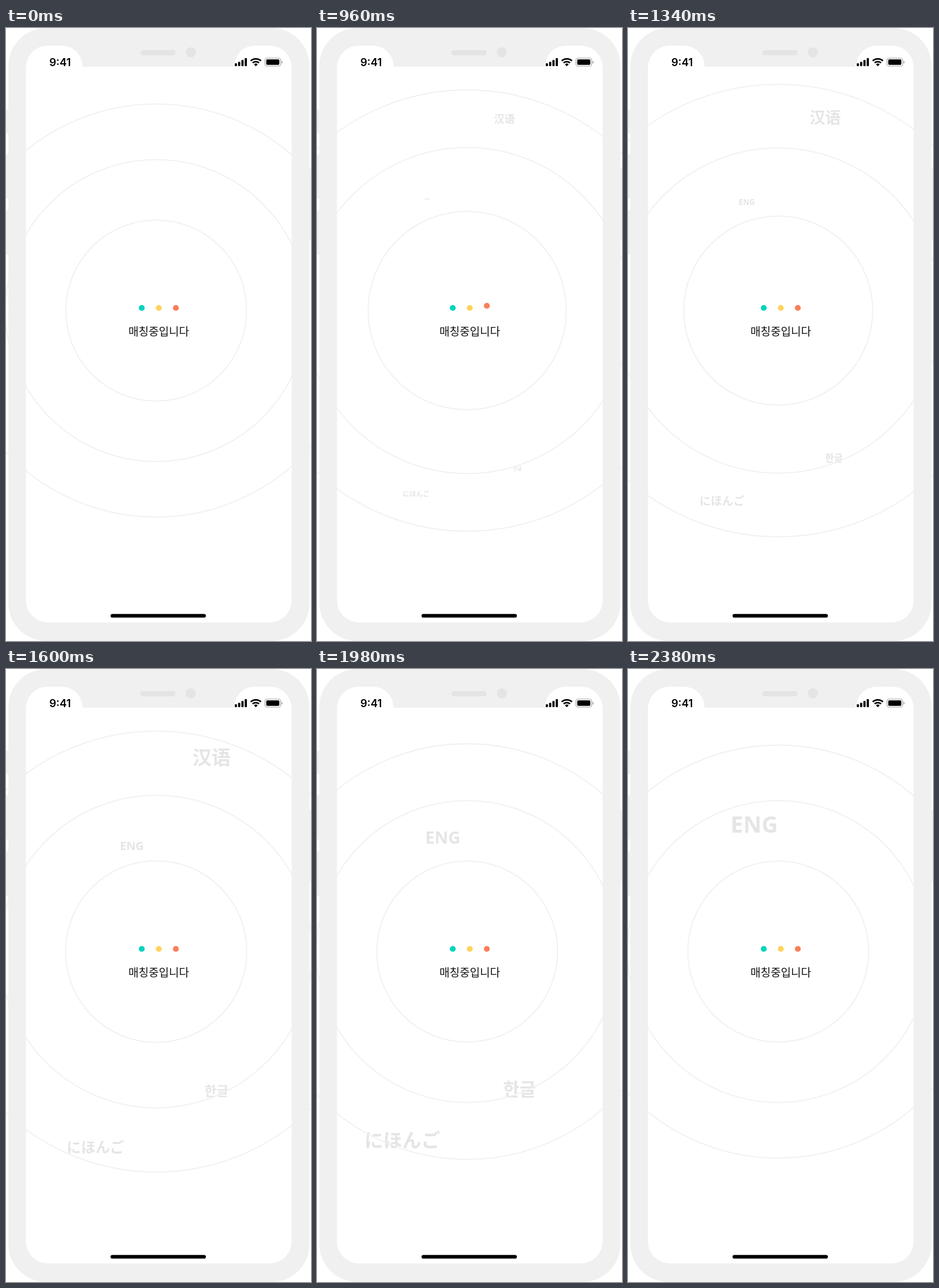
Animation, 528 px wide and 1060 px high, one loop 2400 ms. Source, as an HTML page with a canvas:

```html
<!DOCTYPE html>
<html lang="ko">
<head>
<meta charset="utf-8">
<style>
  html, body { margin: 0; width: 100%; height: 100%; overflow: hidden; background: #fff; }
  canvas { display: block; width: 528px; height: 1060px; }
</style>
</head>
<body>
<canvas id="stage"></canvas>
<script>
const W = 528, H = 1060, LOOP = 2400;
const canvas = document.getElementById('stage');
const ctx = canvas.getContext('2d');
const ratio = window.devicePixelRatio || 1;
canvas.width = W * ratio;
canvas.height = H * ratio;

const BODY = '#f0f0f0', DETAIL = '#e4e4e4', WORD = '#e5e5e5';
const cjk = region => `"Noto Sans CJK ${region}", "Noto Sans CJK", sans-serif`;

// Ripples: resting radius and the moment of full size
const rings = [
  { r: 156.5, peak: 1000 },
  { r: 261, peak: 1200 },
  { r: 357.1, peak: 1400 }
];
const RING_GROWTH = 0.1, RING_FALL = 620;

const dots = [
  { x: 235, color: '#05d2c0' },
  { x: 264.5, color: '#ffd35c' },
  { x: 294, color: '#fb7f59' }
];
const DOT_STEP = 300, DOT_TIME = 500, DOT_RISE = 6.2;

// Words grow from nothing over WORD_TIME while drifting along [time, x, y]
const WORD_TIME = 1600;
const words = [
  { text: '汉语', font: cjk('SC'), weight: 700, size: 37.8,
    path: [[200, 332, 147], [960, 324.5, 158], [1340, 341.5, 155], [1600, 356, 153], [1800, 367, 151.5]] },
  { text: 'にほんご', font: cjk('JP'), weight: 700, size: 33.2,
    path: [[400, 152, 807], [1000, 173.5, 805], [1600, 156, 826], [2000, 148.7, 814]] },
  { text: '한글', font: cjk('KR'), weight: 700, size: 36,
    path: [[600, 338, 778], [960, 347, 761.5], [1340, 356.5, 744], [1600, 364.5, 729], [1980, 350.5, 726], [2200, 339, 724]] },
  { text: 'ENG', font: '"Open Sans", "Noto Sans", sans-serif', weight: 700, size: 39.5,
    path: [[800, 185, 293], [960, 191, 295.5], [1340, 205.8, 301], [1600, 218, 306], [1980, 218, 292], [2400, 218.7, 268]] }
];

const lerp = (a, b, p) => a + (b - a) * p;
const smooth = p => p * p * (3 - 2 * p);

function along(path, t) {
  let i = 1;
  while (i < path.length - 1 && t > path[i][0]) i++;
  const [t0, x0, y0] = path[i - 1], [t1, x1, y1] = path[i];
  const p = (t - t0) / (t1 - t0);
  return [lerp(x0, x1, p), lerp(y0, y1, p)];
}

function box(x, y, w, h, r, color) {
  ctx.fillStyle = color;
  ctx.beginPath();
  ctx.roundRect(x, y, w, h, r);
  ctx.fill();
}

function disc(x, y, r, color) {
  ctx.fillStyle = color;
  ctx.beginPath();
  ctx.arc(x, y, r, 0, Math.PI * 2);
  ctx.fill();
}

// Centres the visible ink of the text on (x, y)
function label(text, font, x, y, color, scale = 1) {
  ctx.save();
  ctx.translate(x, y);
  ctx.scale(scale, scale);
  ctx.font = font;
  ctx.fillStyle = color;
  const m = ctx.measureText(text);
  ctx.fillText(text,
    (m.actualBoundingBoxLeft - m.actualBoundingBoxRight) / 2,
    (m.actualBoundingBoxAscent - m.actualBoundingBoxDescent) / 2);
  ctx.restore();
}

function drawWords(t) {
  for (const { text, font, weight, size, path } of words) {
    const age = (t - path[0][0]) / WORD_TIME;
    if (age <= 0 || age >= 1) continue;
    const [x, y] = along(path, t);
    label(text, `${weight} ${size}px ${font}`, x, y, WORD, age);
  }
}

function drawRings(t) {
  ctx.strokeStyle = BODY;
  ctx.lineWidth = 1.8;
  for (const { r, peak } of rings) {
    const p = t < peak ? t / peak : Math.max(0, 1 - (t - peak) / RING_FALL);
    ctx.beginPath();
    ctx.arc(260, 488.6, r * (1 + RING_GROWTH * p), 0, Math.PI * 2);
    ctx.stroke();
  }
}

function drawDots(t) {
  dots.forEach(({ x, color }, i) => {
    const p = (t - i * DOT_STEP) / DOT_TIME;
    const lift = p > 0 && p < 1 ? smooth(1 - Math.abs(2 * p - 1)) : 0;
    disc(x, 484 - DOT_RISE * lift, 5.1, color);
  });
}

function drawPhone() {
  ctx.fillStyle = BODY;
  ctx.beginPath();
  ctx.roundRect(4, 0, 521.5, 1060, 66);
  // Screen opening with the notch
  ctx.moveTo(34.5, 68);
  ctx.arcTo(34.5, 30.5, 72, 30.5, 37.5);
  ctx.lineTo(97, 30.5);
  ctx.arcTo(132.5, 30.5, 132.5, 67, 35.5);
  ctx.lineTo(132.5, 67);
  ctx.lineTo(395, 67);
  ctx.arcTo(395, 30.5, 431, 30.5, 35.5);
  ctx.arcTo(494.5, 30.5, 494.5, 68, 37.5);
  ctx.arcTo(494.5, 1028, 457, 1028, 38);
  ctx.arcTo(34.5, 1028, 34.5, 990, 38);
  ctx.closePath();
  ctx.fill('evenodd');

  for (const [y, h] of [[141, 41], [218, 77], [315, 77]]) box(0, y, 4.5, h, [2, 0, 0, 2], BODY);
  box(525, 243, 3, 124, [0, 2, 2, 0], BODY);
  box(232.5, 38.2, 61, 9, 4.5, DETAIL);
  disc(320, 42, 8.8, DETAIL);
  box(181, 1013.2, 165, 6.3, 3.1, '#000');
}

function drawStatus() {
  label('9:41', '600 18.6px Inter, sans-serif', 93.2, 58.9, '#000');

  [5, 7.6, 10.8, 14].forEach((h, i) => box(396 + i * 5.75, 66 - h, 3.8, h, 1.2, '#000'));

  const cx = 432.5, cy = 66.2, spread = 0.76, up = -Math.PI / 2;
  ctx.strokeStyle = ctx.fillStyle = '#000';
  ctx.lineWidth = 2.7;
  for (const r of [12.9, 8.1]) {
    ctx.beginPath();
    ctx.arc(cx, cy, r, up - spread, up + spread);
    ctx.stroke();
  }
  ctx.beginPath();
  ctx.moveTo(cx, cy);
  ctx.arc(cx, cy, 4.7, up - spread, up + spread);
  ctx.fill();

  ctx.strokeStyle = '#a3a3a3';
  ctx.lineWidth = 1.2;
  ctx.beginPath();
  ctx.roundRect(448.3, 52, 27.2, 14, 3.6);
  ctx.stroke();
  box(477, 56.8, 1.5, 4.6, [0, 1.5, 1.5, 0], '#a3a3a3');
  box(450.5, 54.3, 22.7, 9.4, 1.8, '#000');
}

function draw() {
  const t = performance.now() % LOOP;
  ctx.setTransform(ratio, 0, 0, ratio, 0, 0);
  ctx.fillStyle = '#fff';
  ctx.fillRect(0, 0, W, H);
  drawWords(t);
  drawRings(t);
  drawPhone();
  drawStatus();
  drawDots(t);
  label('매칭중입니다', `400 19px ${cjk('KR')}`, 264.7, 524.3, '#111');
  requestAnimationFrame(draw);
}
draw();
</script>
</body>
</html>
```
